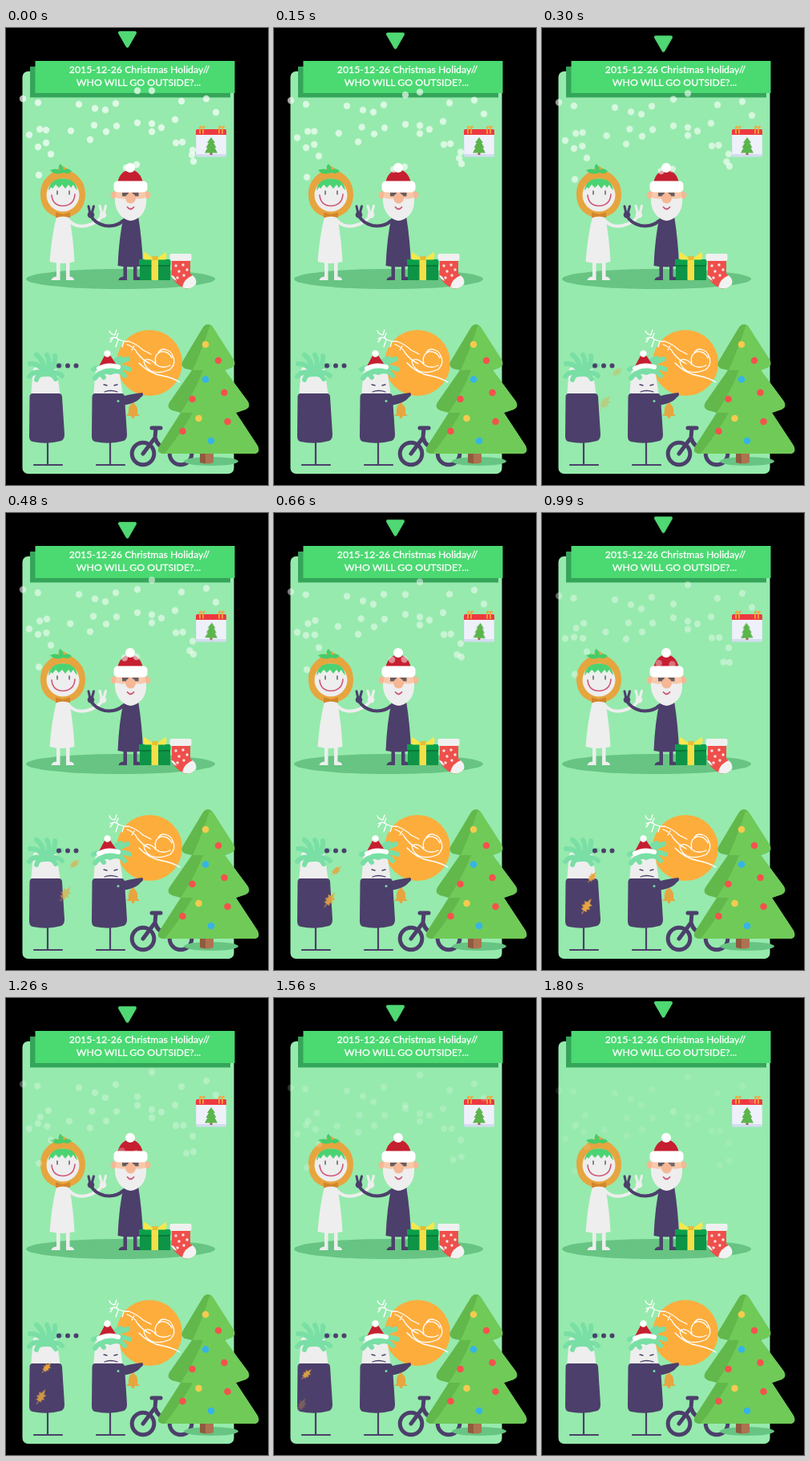
Recreate the animation shown at these times as an HTML page. Size 327 px wide and 569 px high, loop 1830 ms.

```html
<!DOCTYPE html>
<html lang="en">
<head>
<meta charset="utf-8">
<title>Holiday card</title>
<style>
  html, body { margin: 0; width: 100%; height: 100%; overflow: hidden; background: #000; }
  svg { display: block; width: 327px; height: 569px; }
  text { font: 12.3px Lato, "Open Sans", sans-serif; fill: #fff; stroke: #fff; stroke-width: .3; text-anchor: middle; }
  .line { fill: none; stroke-linecap: round; stroke-linejoin: round; }
  .plum { fill: #4c3f6b; }
  .plum-line { stroke: #4c3f6b; }
  .pale { fill: #eee; }
  .pale-line { stroke: #eee; }
  .orange { fill: #e6a53f; }
  .teal-line { stroke: #79dfa5; stroke-width: 6; }
  .red { fill: #f4524d; }
  .blue { fill: #35b4e8; }
  .gold { fill: #f5ca50; }

  .arrow, .flake, .leaf, .mini { animation: 1830ms linear infinite; }
  .arrow { animation: bob 457.5ms ease-in-out infinite alternate; }
  .flake { animation-name: drift; fill: #fff; }
  .leaf { fill: #e6a53f; }
  .leaf1 { animation-name: fall1; }
  .leaf2 { animation-name: fall2; }
  .mini { animation-name: sway; transform-origin: 256px 157px; }

  @keyframes bob {
    to { transform: translateY(7.2px); }
  }
  @keyframes drift {
    from { transform: none; opacity: .7; }
    to { transform: translate(var(--dx), var(--dy)); opacity: .1; }
  }
  @keyframes fall1 {
    0%, 8% { transform: translate(102px, 419px) rotate(60deg) scale(.75); opacity: 0; }
    16.4% { transform: translate(94px, 428px) rotate(52deg) scale(.75); opacity: .4; }
    36% { transform: translate(78px, 445px) rotate(48deg) scale(.75); opacity: .9; }
    54% { transform: translate(63px, 453px) rotate(38deg) scale(.75); opacity: 1; }
    68.9% { transform: translate(51px, 460px) rotate(42deg) scale(.75); opacity: 1; }
    85.2% { transform: translate(41px, 468px) rotate(45deg) scale(.75); opacity: .95; }
    94%, 100% { transform: translate(36px, 472px) rotate(45deg) scale(.75); opacity: 0; }
  }
  @keyframes fall2 {
    0%, 8% { transform: translate(84px, 458px) rotate(40deg); opacity: 0; }
    16.4% { transform: translate(79px, 466px) rotate(36deg); opacity: .4; }
    36% { transform: translate(70px, 481px) rotate(36deg); opacity: .9; }
    54% { transform: translate(56px, 489px) rotate(32deg); opacity: 1; }
    68.9% { transform: translate(44px, 496px) rotate(30deg) scale(.95); opacity: .85; }
    85.2% { transform: translate(35px, 506px) rotate(28deg) scale(.85); opacity: .3; }
    92%, 100% { transform: translate(31px, 511px) rotate(25deg) scale(.8); opacity: 0; }
  }
  @keyframes sway {
    0%, 16%, 69%, 100% { transform: none; }
    36% { transform: rotate(5deg) scale(.96); }
    54% { transform: rotate(-3deg) scale(.96); }
  }
</style>
</head>
<body>
<svg viewBox="0 0 327 569">
  <defs>
    <path id="oak" d="M-.5 12L-.5 7L-4 7L-2.5 4L-6 2L-3 0L-5.500-4L-2-4L0-11L2-4L5.500-4L3 0L6 2L2.500 4L4 7L.5 7L.5 12Z"/>
    <g id="plant">
      <path class="pale" d="M31 459L34 424Q49 413 63 424L68 459Z"/>
      <path class="plum" d="M33 455H66Q69.500 455 70 459L73 506Q73 512 69 514Q51 519 33 515Q29 514 29 508L29.500 459Q30 455 33 455Z"/>
      <path class="line plum-line" stroke-width="2.2" d="M52 515V543.500M35 544H70"/>
    </g>
  </defs>

  <rect x="20.500" y="54" width="264" height="501" rx="7" fill="#96eaad"/>
  <path fill="#35a55a" d="M30 48H280V86.500H30Z"/>
  <path fill="#4bd972" d="M36.500 41H285.500V81H36.500Z"/>
  <text x="166.500" y="56">2015-12-26 Christmas Holiday//</text>
  <text x="165.500" y="71.500">WHO WILL GO OUTSIDE?...</text>
  <path class="arrow" fill="#4fd873" stroke="#4fd873" stroke-width="4" stroke-linejoin="round" d="M142 6H161L151.500 22.500Z"/>

  <!-- calendar -->
  <g>
    <rect x="237" y="126" width="38" height="34.500" rx="1.500" fill="#d3dcf0"/>
    <path fill="#eff1fa" d="M237.500 132H274.500V157H237.500Z"/>
    <path fill="#ee3940" d="M237 127.500Q237 126 239 126H273.500Q275 126 275 127.500V133H237Z"/>
    <path class="line" stroke="#f5a33a" stroke-width="1.800" d="M242 131V125Q242 122 244 123M246 131V125Q246 122 248 123M266 131V125Q266 122 268 123M270 131V125Q270 122 272 123"/>
    <g class="mini">
      <path fill="#9a6a48" d="M254.500 154H257.500V158H254.500Z"/>
      <path fill="#5bb54c" d="M256 136L261 143H259L262.500 149H260.500L264 155.500H248L251.500 149H249.500L253 143H251Z"/>
    </g>
  </g>

  <ellipse cx="143" cy="312.500" rx="118" ry="12.500" fill="#67c482"/>

  <!-- hooded figure -->
  <g>
    <path class="orange" d="M71 171.500C80 179 99 184 99 207C99 226 86 236 71 236C56 236 43 226 43 207C43 184 62 179 71 171.500Z"/>
    <path fill="#45cc6b" d="M72 180Q61 184 55 177Q62 174 67 177Q64 172 68 169Q71 172 72 177Q77 173 82 178Q78 183 72 180Z"/>
    <circle class="pale" cx="71" cy="208" r="20.500"/>
    <path fill="#4bd372" d="M53 202Q55 187.500 71 187.500Q87 187.500 89 202Q86 200 84 195L81 199L78 195L74 200L70 195L66 199L62 195L58 200L56 198Q55 201 53 202Z"/>
    <path class="line" stroke="#4b4b50" stroke-width="1.300" d="M64 203V207M79 203V207"/>
    <path class="line" stroke="#cf5577" stroke-width="1.600" d="M57 208Q58 221 71 221.500Q85 221 86 207"/>
    <path class="pale" d="M63 235H79Q84 262 85.500 291Q71 295 54.500 291Q57 258 63 235Z"/>
    <path fill="#d3862d" d="M71 232L62 229.500V236.500L71 234L80 236.500V229.500Z"/>
    <path class="pale" d="M63 290H67.500V314H56.500Q57 310 63 309.500ZM75 290H79.500V309.500Q85 310 85 314H75Z"/>
    <path class="line pale-line" stroke-width="4" d="M79 240Q87 249 101 246Q114 243 120 234"/>
    <path class="line pale-line" stroke-width="3" d="M120 232L117 221.500M122 231L124.500 221.500"/>
    <circle class="pale" cx="121" cy="232.500" r="4.300"/>
  </g>

  <!-- bearded figure -->
  <g>
    <path class="plum" d="M147 234H165Q170 265 171 296Q155 299 139.500 296Q141 260 147 234Z"/>
    <path class="plum" d="M146.500 295H151V314H140.500Q141 310 146.500 309.500ZM159 295H163.500V309.500Q170 310 170.500 314H159Z"/>
    <path class="line plum-line" stroke-width="4" d="M146 240Q138 248 123 246Q111 243 106 234"/>
    <path class="line plum-line" stroke-width="3" d="M105 231L103 222M107 231L109.500 222"/>
    <circle class="plum" cx="106" cy="232.500" r="4.300"/>
    <circle cx="135" cy="208" r="4.500" fill="#f5b795"/>
    <circle cx="176" cy="208" r="4.500" fill="#f5b795"/>
    <path fill="#f8c8a9" d="M137 199H174V216H137Z"/>
    <path class="pale" d="M136 211Q145 214 150 212Q155 218 161 212Q168 214 175 211Q176 225 169 233Q162 240 155 240Q147 239 141 231Q135 222 136 211Z"/>
    <path fill="#655d63" d="M145 205H153V209.500H145ZM157.500 205H165.500V209.500H157.500Z"/>
    <circle cx="155.500" cy="212" r="6.500" fill="#f5b795"/>
    <path class="line" stroke="#cf5577" stroke-width="1.800" d="M151.500 223Q155.500 228 159.500 223"/>
    <path fill="#c51f30" d="M139 193Q142 178 155 176Q168 178 171 193Z"/>
    <rect x="134.500" y="190.500" width="42" height="14" rx="5" fill="#fff"/>
    <circle cx="155" cy="174" r="6" fill="#fff"/>
  </g>

  <!-- gift and stocking -->
  <g>
    <path fill="#0e9447" d="M167 292H205V314H167Z"/>
    <path fill="#0ba04b" d="M166 288H205.500V295H166Z"/>
    <path fill="#087a38" d="M167 295H205V297H167Z"/>
    <path fill="#f5df48" d="M181.500 288H190V314H181.500Z"/>
    <path fill="#f6e84a" d="M185 288L173 279Q170 283 173 288.500H199Q202 283 199 279L187 288Z"/>
    <path fill="#e5bd34" d="M182.500 284H189.500V289H182.500Z"/>
    <path fill="#ef4f4b" d="M207 289H230V306Q238 311 237 318Q231 326 222 324Q210 318 207 309Z"/>
    <path fill="#f2f2f2" d="M220 323Q222 312 233 308Q239 313 237 319Q230 327 220 323ZM206 308Q210 307 213 315Q208 313 206 308Z"/>
    <rect x="204.500" y="281" width="27" height="9" rx="2" fill="#f0f0f0"/>
    <g fill="#f6e6e6">
      <circle cx="212" cy="296" r="1.700"/><circle cx="221" cy="295" r="1.700"/><circle cx="226" cy="301" r="1.700"/>
      <circle cx="216" cy="303" r="1.700"/><circle cx="222" cy="308" r="1.700"/><circle cx="214" cy="311" r="1.700"/>
    </g>
  </g>

  <!-- sun and sleigh -->
  <circle cx="179" cy="417" r="41" fill="#fdad3c"/>
  <path class="line" stroke="#fff" stroke-width="1.300" d="M129 377Q131 382 136 382L138 376M130 387Q136 383 141 388Q148 391 153 390M140 380L138 385M133 387L130 391M140 388L137 397M147 391L145 397M153 390Q164 394 171 401L181 406M151 394Q160 397 164 405Q170 413 180 418M160 396L157 401M172 413Q172 422 181 427Q192 431 205 425Q213 417 208 408M174 413Q181 411 187 419Q195 425 205 420M187 418Q184 407 193 403Q203 402 207 411M190 404Q194 398 201 401Q207 403 208 409M166 417Q178 430 195 433Q207 435 217 441"/>

  <!-- plant figures -->
  <use href="#plant"/>
  <path class="line teal-line" d="M48 430Q42 417 30 418M48 430Q48 414 38 407M49 429Q57 417 51 407M50 429Q63 420 61 408M50 430Q60 419 69 420M50 431Q62 426 70 433M48 431Q36 425 29 434M48 431Q39 431 38 438M51 431Q59 430 62 437"/>
  <g class="plum">
    <circle cx="66" cy="420.500" r="3"/><circle cx="77" cy="420.500" r="3"/><circle cx="87.500" cy="420.500" r="3"/>
  </g>
  <use href="#plant" x="78"/>
  <path class="line teal-line" d="M128 428Q119 419 109 425M128 428Q117 427 111 436M128 428Q132 415 143 411M129 428Q138 416 152 412M130 428Q142 419 154 425M130 429Q142 424 148 433M120 427Q119 432 122 435"/>
  <path fill="#c51f30" d="M115 423L124 406H129L139 421Z"/>
  <path class="line" stroke="#fff" stroke-width="6" d="M116 424Q127 418 140 422"/>
  <circle cx="126.500" cy="405.500" r="4.200" fill="#fff"/>
  <path class="line plum-line" stroke-width="1.300" d="M123 453Q130 450 139 453M122 444L126 445M135 445L139 444"/>
  <path class="orange" d="M157 465H160V468Q165 471 164 480L167 483H150L153 480Q152 470 157 468Z"/>
  <circle class="orange" cx="158.500" cy="484" r="2"/>
  <path class="plum" d="M138 461Q152 456 170 454Q173 457 168 460Q162 468 143 470Q136 468 138 461Z"/>
  <circle cx="140" cy="464.500" r="1.500" fill="#79dfa5"/>

  <!-- bicycle -->
  <g class="line plum-line" stroke-width="5">
    <circle cx="171" cy="530" r="13.800"/>
    <circle cx="218" cy="530" r="13.800"/>
    <path d="M171 530L186 510L187 498M186 510Q190 524 203 522L210 508M182 498H193"/>
  </g>

  <!-- big tree -->
  <ellipse cx="256" cy="539.500" rx="34" ry="5.500" fill="#67c482"/>
  <path fill="#ad7350" d="M242 528H259V541Q251 544 242 541Z"/>
  <path fill="#8f5b3e" d="M242 528H249V542L242 541Z"/>
  <path fill="#62b84b" d="M252 369Q256 369 259 374L284 413Q288 420 281 423L273 426L302 465Q306 472 299 475L287 479L314 520Q318 529 310 530H196Q187 529 191 521L218 479L207 476Q200 473 204 466L232 426L223 424Q217 420 221 414L245 374Q248 369 252 369Z"/>
  <path fill="#70ca58" d="M254 371Q257 371 259 374L284 413Q288 420 281 423L273 426L302 465Q306 472 299 475L287 479L314 520Q318 529 310 530H198Q218 505 233 479H218Q235 454 246 426H233Q246 397 254 371Z"/>
  <g class="red">
    <circle cx="265" cy="414" r="4.300"/><circle cx="232.500" cy="462" r="4.300"/><circle cx="272.500" cy="454" r="4.300"/>
    <circle cx="276.500" cy="490" r="4.300"/><circle cx="220.500" cy="502" r="4.300"/>
  </g>
  <g class="gold"><circle cx="249" cy="394" r="4.300"/><circle cx="240.500" cy="486" r="4.300"/></g>
  <g class="blue"><circle cx="249" cy="437.500" r="4.300"/><circle cx="256" cy="514" r="4.300"/></g>

  <use class="leaf leaf1" href="#oak"/>
  <use class="leaf leaf2" href="#oak"/>
  <g id="snow"></g>
</svg>
<script>
  // start x, start y, end x, end y
  const flakes = [
    [21,88,21,116], [40,93,39,117], [91,95,91,119], [111,100,111,126], [124,102,124,134],
    [137,94,137,114], [164,78,164,143], [182,78,182,99], [219,91,219,119], [250,88,250,110],
    [262,105,262,128], [211,114,211,142], [212,143,212,166], [182,119,182,148], [182,129,182,158],
    [194,124,194,150], [164,118,164,141], [220,142,222,166], [232,158,222,209], [233,152,233,181],
    [234,166,234,203], [29,133,29,176], [40,148,40,160], [50,143,52,167], [56,157,56,186],
    [41,183,41,216], [42,126,43,158], [50,127,54,146], [81,128,78,165], [105,139,105,172],
    [125,129,125,164], [138,122,138,150], [110,121,106,150], [150,174,142,198], [163,170,162,204]
  ];
  const snow = document.getElementById("snow");
  for (const [x, y, endX, endY] of flakes) {
    const dot = document.createElementNS("http://www.w3.org/2000/svg", "circle");
    dot.setAttribute("class", "flake");
    dot.setAttribute("cx", x);
    dot.setAttribute("cy", y);
    dot.setAttribute("r", 4.2);
    dot.style.setProperty("--dx", endX - x + "px");
    dot.style.setProperty("--dy", endY - y + "px");
    snow.append(dot);
  }
</script>
</body>
</html>
```
